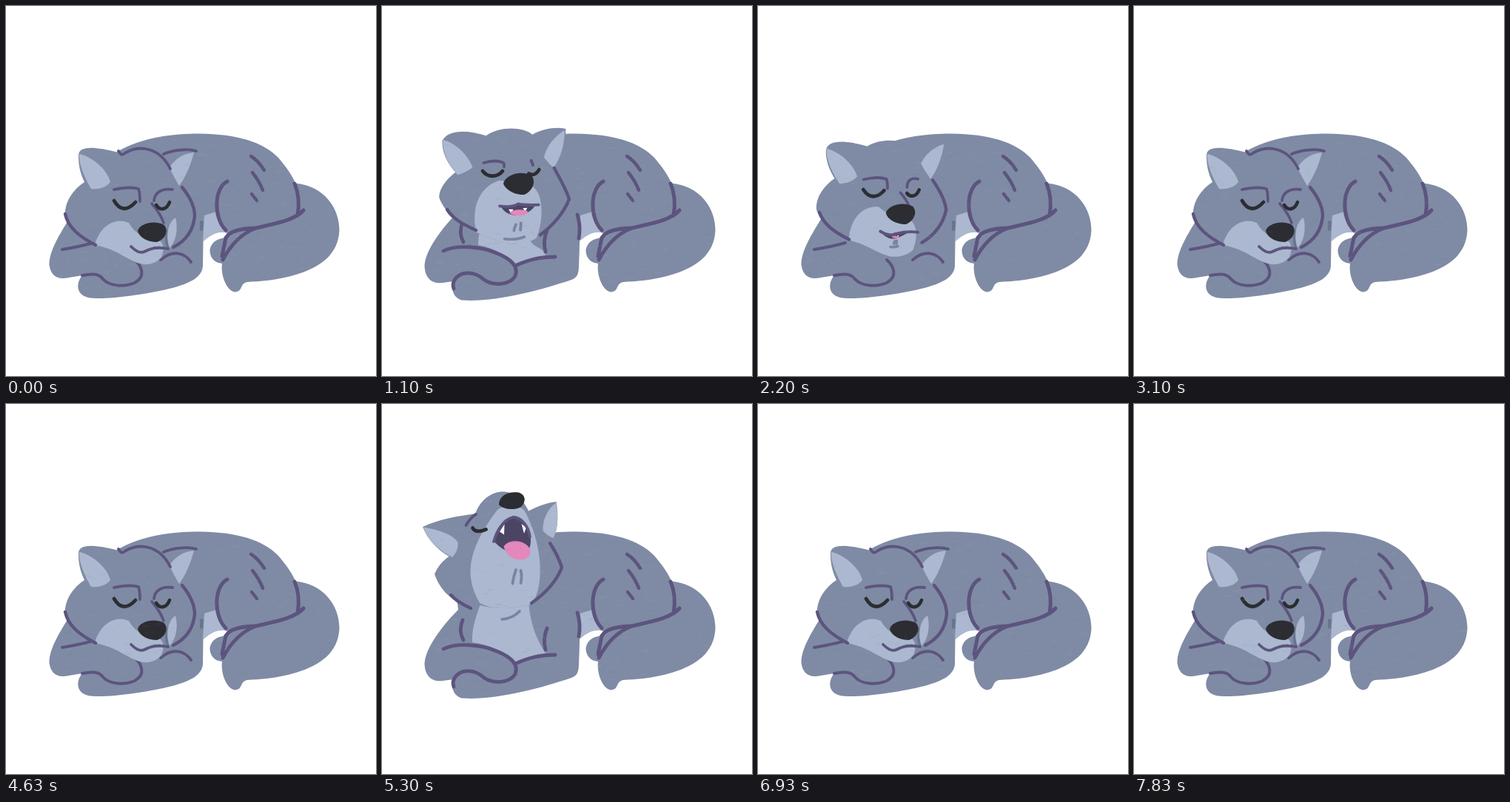
These frames come from a looping animation (500x500 px, 7.91 s). An HTML page with a canvas:

```html
<!DOCTYPE html>
<html lang="en">
<head>
<meta charset="utf-8">
<title>Sleepy wolf</title>
<style>
html, body { margin: 0; width: 100%; height: 100%; overflow: hidden; background: #fff; }
canvas { display: block; width: 500px; height: 500px; }
</style>
</head>
<body>
<canvas id="stage" width="500" height="500"></canvas>
<script>
const ctx = document.getElementById('stage').getContext('2d');
const LOOP = 7910, CYCLE = 36;
const FUR = '#7f8ba4', LIGHT = '#abb8cf', LINE = '#5c547f', INK = '#2b2d32',
  PINK = '#e487bd', MOUTH = '#4b4563', SHADE = '#69758f', TICK = '#7884a0';

const body = {
  fill: 'M150 197C185 177 225 172.500 262 172.500C312 173 348 184 368 205C379 218 387 229 391 239.500C429 243 450.500 272 450.500 303C449 336 425 353 392 363C365 371 342 372 326 373C315 375 321 386 309 386.500C297 384 290 362 292 348C280 347 275 338 275.500 329C278 318 287 314 297 313L299 307C288 302 275 310 266.500 318L266 352L190 340Z',
  belly: 'M268 283L284 278C286 290 290 300 299 307C287 303 276 309 266 318Z',
  lines: 'M299 237C281 246 280 286 297 303M390 240C395 252 397 266 394 283M402 276C390 290 362 294 338 300C319 307 304 322 293 343M297 314C301 304 316 301 336 300M297 313L292 338',
  ticks: 'M331 203Q341 209 349 222M333 225Q342 236 347 249M332 254L339 263'
};

const paws = {
  down: {
    fill: 'M85 288C75 305 58 330 58.500 350C61 367 72 370 85 367L103 364C94 375 95 390 111 394C130 398 190 390 225 381C250 374 266 366 266 350L266 290L220 250Z',
    lines: 'M76 329Q96 326 118 320M103 364C118 361 126 362 131 369C140 379 160 380 174 374C189 366 184 352 174 343M209 343C225 329 241 333 250 346'
  },
  up: {
    fill: 'M101 262L103 278C88 293 60 325 57.500 350C57.500 368 68 376 82 374L97 372C92 382 97 395 108 397.500C150 401 215 384 256 370C264 367 266 362 266 350L268 290L240 200Z',
    lines: 'M83 331C100 322 135 325 155 334C175 342 185 352 180 365C172 378 150 378 138 370C125 358 105 357 97 372Q95 377 97 382M180 351C200 342 215 339 234 339M109 292Q103 306 110 319M223 303Q217 318 221 332M264 282Q269 298 266 314'
  }
};

// Head poses share path layouts; a missing part shrinks into `hide`.
const poses = {
  sleep: {
    hide: [187, 332],
    head: 'M98 203C97 189 117 189 152 198C170 188 200 190 212 201C228 194 244 193 257 196C254 212 246 232 238 245C247 256 256 270 255 285C253 304 242 320 222 327C215 337 205 349 185 349C165 345 150 330 125 325C105 318 84 300 80 285C78 262 95 245 106 238C100 225 98 215 98 203Z',
    earL: 'M99 200C112 202 136 218 141 238C134 247 122 248 115 247C108 235 98 215 99 200Z',
    earR: 'M254 198C240 199 228 207 221 218C224 226 230 236 234 243C243 231 250 214 254 198Z',
    muzzle: 'M120 323C126 300 145 284 166 293C172 304 185 316 206 316C214 320 214 330 210 339C205 346 196 350 185 349C165 345 150 328 120 323Z',
    cheekL: 'M80 281C84 300 100 312 121 323',
    cheekR: 'M238 245C247 256 255 270 255 284C253 304 242 318 226 326',
    browL: 'M146 248C160 245 172 245 179 247C181 252 181 258 181 264',
    browR: 'M225 248C212 246 201 251 200 263',
    snout: 'M197 267C203 274 210 284 213 293',
    eyeL: 'M146 263C154 277 164 277 175 265',
    eyeR: 'M203 269C208 277 217 276 221 265',
    mouth: 'M169 325C175 331 181 334 187 332C195 328 200 324 209 325C200 325 195 329 187 333C181 335 175 332 169 325Z',
    lip: 'M169 325C175 331 181 335 187 332C195 328 202 325 219 328',
    nose: 'M178 304C180 294 200 289 212 295C220 300 218 314 204 319C192 319 180 313 178 304Z'
  },
  low: {
    hide: [179, 208],
    chest: 'M137 290C132 303 130 312 130 323C150 326 168 337 180 350C195 343 208 340 221 337C218 325 205 328 200 316C196 309 200 303 200 296Z',
    head: 'M73 172C84 157 112 155 135 164C155 149 185 150 199 160C212 152 230 148 244 151C246 172 240 194 231 206C240 222 250 236 253 248C244 268 226 288 208 301C198 305 184 308 168 308C155 307 142 304 131 297C108 289 84 268 76 246C76 238 86 226 96 218C82 206 73 190 73 172Z',
    earL: 'M74 171C92 176 106 192 113 208C106 212 100 216 96 219C82 206 73 190 74 171Z',
    earR: 'M243 153C230 164 218 183 218 198C222 201 226 204 231 206C240 194 246 172 243 153Z',
    muzzle: 'M131 297C118 262 122 225 155 207C166 203 190 203 202 208C221 220 221 270 208 301C198 305 184 308 168 308C155 307 142 304 131 297Z',
    cheekL: 'M92 272C102 282 115 287 130 293',
    cheekR: 'M230 206C237 222 246 236 252 250C241 268 225 286 208 301',
    browL: 'M133 194C140 191 150 191 157 194C157 194 157 194 157 194',
    browR: 'M190 191C196 188 202 188 206 191',
    eyeL: 'M131 203C138 210 152 209 157 202',
    eyeR: 'M196 205C201 206 205 203 208 199',
    mouth: 'M156 243C165 241 176 240 183 236C190 240 200 241 207 240C206 250 200 256 184 258C172 258 160 254 156 243Z',
    lip: 'M154 243C165 242 176 240 183 235C190 240 200 241 208 239',
    tongue: 'M165 253C172 246 192 245 202 250C200 257 192 260 184 259C176 259 168 257 165 253Z',
    teeth: 'M163 246L173 246L168 254ZM192 244L201 243L197 251Z',
    ticks: 'M178 277Q175 283 174 289M188 274Q188 281 187 288',
    chin: 'M155 306Q178 309 195 302',
    nose: 'M157 208C160 195 182 188 196 196C203 202 198 218 186 223C174 224 160 216 157 208Z'
  },
  high: {
    hide: [176, 148],
    chest: 'M135 266C129 284 121 300 122 322C145 325 165 335 180 350C195 343 208 340 221 337C212 322 200 302 198 266Z',
    head: 'M60 162C80 154 105 150 128 149C140 137 180 127 197 147C208 140 222 133 237 131C240 152 238 172 231 182C238 196 245 212 244 222C236 242 222 258 203 271C190 275 178 277 165 277C152 277 142 275 132 273C106 276 82 260 72 231C75 222 82 213 91 206C78 197 66 182 60 162Z',
    earL: 'M61 163C82 167 98 175 104 186C105 195 101 202 96 207C80 199 66 182 61 163Z',
    earR: 'M236 133C224 142 217 158 218 172C222 177 226 180 231 182C238 172 240 152 236 133Z',
    muzzle: 'M132 270C108 228 122 190 157 156C168 150 186 152 193 158C214 186 222 240 203 271C190 275 178 277 165 277C152 277 142 275 132 270Z',
    cheekL: 'M94 259C100 266 110 272 121 277',
    cheekR: 'M227 189C234 200 240 212 243 222C236 240 222 256 202 270',
    browL: 'M114 166C118 160 123 154 128 151C128 151 128 151 128 151',
    eyeL: 'M124 169C128 176 136 174 142 172',
    mouth: 'M152 188C158 180 165 170 178 167C188 166 196 170 199 178C200 184 198 184 192 182C180 180 166 184 152 188Z',
    lip: 'M152 188C158 180 165 170 178 167C188 166 196 170 198 179',
    tongue: 'M166 182C176 174 198 176 204 189C206 198 198 200 188 198C176 195 172 188 166 182Z',
    teeth: 'M162 179L168 173L166 182ZM189 173L193 169L194 179Z',
    ticks: 'M181 210Q177 222 176 233M187 212Q189 222 187 232',
    chin: 'M164 292Q178 290 186 280',
    nose: 'M158 154C158 141 170 134 185 136C196 140 194 150 187 156C178 161 164 160 158 154Z'
  },
  yawn: {
    hide: [176, 114],
    chest: 'M135 262C129 282 121 300 122 322C145 325 165 335 180 350C195 343 208 340 221 337C212 322 200 302 198 262Z',
    head: 'M50 170C72 158 100 152 124 148C138 88 182 86 199 142C210 138 222 134 234 133C238 152 237 172 231 180C238 194 245 210 244 220C236 240 222 256 203 269C190 273 178 275 165 275C152 275 142 273 132 271C106 274 80 258 70 229C74 220 80 212 90 206C74 198 58 186 50 170Z',
    earL: 'M51 170C72 173 94 178 101 188C102 196 98 202 94 207C76 198 58 186 51 170Z',
    earR: 'M234 134C222 142 216 158 217 171C222 175 226 178 231 180C237 172 238 152 234 134Z',
    muzzle: 'M132 268C106 226 122 186 155 130C166 120 184 120 192 130C214 180 222 238 203 269C190 273 178 275 165 275C152 275 142 273 132 268Z',
    cheekL: 'M92 257C98 264 108 270 119 275',
    cheekR: 'M227 187C234 198 240 210 243 220C236 238 222 254 202 268',
    browL: 'M113 162C116 156 120 150 126 147C126 147 126 147 126 147',
    eyeL: 'M121 166C125 173 133 170 139 167',
    mouth: 'M150 182C152 164 162 142 176 139C190 140 200 162 202 178C205 202 198 222 180 224C162 224 150 204 150 182Z',
    lip: 'M150 184C152 164 162 142 176 139C190 140 200 162 202 180',
    tongue: 'M163 203C168 190 188 190 196 203C198 216 190 222 181 223C170 222 162 216 163 203Z',
    teeth: 'M156 166L163 152L164 171ZM188 151L197 165L190 171Z',
    ticks: 'M181 238Q178 245 177 252M188 238Q190 245 188 252',
    chin: 'M160 290Q175 290 186 280',
    nose: 'M158 118C158 107 170 101 184 103C196 107 194 118 187 123C178 127 164 125 158 118Z'
  }
};
poses.sleep.chest = poses.low.chest;

// Pose reached at each drawing of one breath-and-yawn cycle.
const keys = [[0, 'sleep'], [7, 'sleep'], [10, 'low'], [11, 'high'], [13, 'yawn'],
  [14, 'yawn'], [15, 'high'], [16, 'low'], [20, 'sleep'], [CYCLE, 'sleep']];

// Drawings come in groups of ten per 1100 ms.
const beats = [0, 100, 200, 330, 430, 530, 660, 760, 860, 960];

function drawingAt(ms) {
  if (ms < 470) return [130, 230, 330].filter(b => ms >= b).length;
  const t = ms - 470;
  return 4 + 10 * Math.floor(t / 1100) + beats.filter(b => t % 1100 >= b).length - 1;
}

function shrink(path, [x, y]) {
  let i = 0;
  return path.replace(/[\d.]+/g, () => (i++ % 2 ? y : x));
}

function blend(part, a, b, k) {
  let from = a[part], to = b[part];
  if ((!from && !to) || (!from && k === 0)) return null;
  if (k === 0) return from;
  from = from || shrink(to, a.hide);
  to = to || shrink(from, b.hide);
  const ends = to.match(/[\d.]+/g);
  let i = 0;
  return from.replace(/[\d.]+/g, n => (+n + (ends[i++] - n) * k).toFixed(2));
}

function fill(path, color) {
  if (!path) return;
  ctx.fillStyle = color;
  ctx.fill(new Path2D(path));
}

function line(path, color = LINE, width = 4.4) {
  if (!path) return;
  ctx.strokeStyle = color;
  ctx.lineWidth = width;
  ctx.stroke(new Path2D(path));
}

function drawHead(part, asleep) {
  fill(part('head'), FUR);
  fill(part('earL'), LIGHT);
  fill(part('earR'), LIGHT);
  fill(part('muzzle'), LIGHT);
  if (asleep) {
    fill('M219 300C213 310 214 324 219 329L224 322Z', SHADE);
    fill('M229 286C219 292 215 311 221 327C230 318 233 300 229 286Z', LIGHT);
    line('M152 196C156 203 158 201 162 198C180 188 207 190 222 220', LINE, 3.8);
    line('M213 200C225 195 245 192 257 196', LINE, 3.8);
  }
  line(part('cheekL'));
  line(part('cheekR'));
  line(part('browL'), LINE, 3.8);
  line(part('browR'), LINE, 3.8);
  line(part('snout'), LINE, 3.6);
  line(part('eyeL'), INK, 4.8);
  line(part('eyeR'), INK, 4.6);
  fill(part('mouth'), MOUTH);
  fill(part('teeth'), '#fff');
  fill(part('tongue'), PINK);
  line(part('lip'), LINE, 3.8);
  line(part('ticks'), TICK, 3.8);
  line(part('chin'), TICK, 3.6);
  fill(part('nose'), INK);
}

// Soft paper grain that shifts with every drawing.
function drawGrain(seed) {
  let s = seed * 7919 + 17;
  const rnd = () => (s = (s * 16807) % 2147483647) / 2147483647;
  for (let i = 0; i < 20; i++) rnd();
  ctx.globalCompositeOperation = 'source-atop';
  for (let i = 0; i < 420; i++) {
    ctx.fillStyle = rnd() < 0.5 ? 'rgba(60,64,100,.04)' : 'rgba(200,210,230,.04)';
    ctx.fillRect(50 + rnd() * 400, 100 + rnd() * 300, 2 + rnd() * 8, 1 + rnd() * 2);
  }
  ctx.globalCompositeOperation = 'source-over';
}

function draw(n) {
  const f = n % CYCLE;
  let i = 0;
  while (f >= keys[i + 1][0]) i++;
  const [start, from] = keys[i], [end, to] = keys[i + 1];
  const k = from === to ? 0 : (f - start) / (end - start);
  const rest = (from === 'sleep' ? 1 - k : 0) + (to === 'sleep' ? k : 0);
  const arms = rest > 0.5 ? paws.down : paws.up;
  const part = name => blend(name, poses[from], poses[to], k);

  ctx.clearRect(0, 0, 500, 500);
  ctx.lineCap = ctx.lineJoin = 'round';
  fill(body.fill, FUR);
  fill(body.belly, LIGHT);
  line(body.lines, LINE, 5);
  line(body.ticks);
  fill(arms.fill, FUR);
  if (arms === paws.up) fill(part('chest'), LIGHT);
  else fill('M262 290L267 291L266 304L262 303Z', SHADE);
  line(arms.lines, LINE, arms === paws.up ? 4.8 : 4);
  drawHead(part, rest > 0.9);
  drawGrain(n);
}

let shown = -1;
const t0 = performance.now();
function tick() {
  const n = drawingAt((performance.now() - t0) % LOOP);
  if (n !== shown) draw(shown = n);
  requestAnimationFrame(tick);
}
tick();
</script>
</body>
</html>
```
